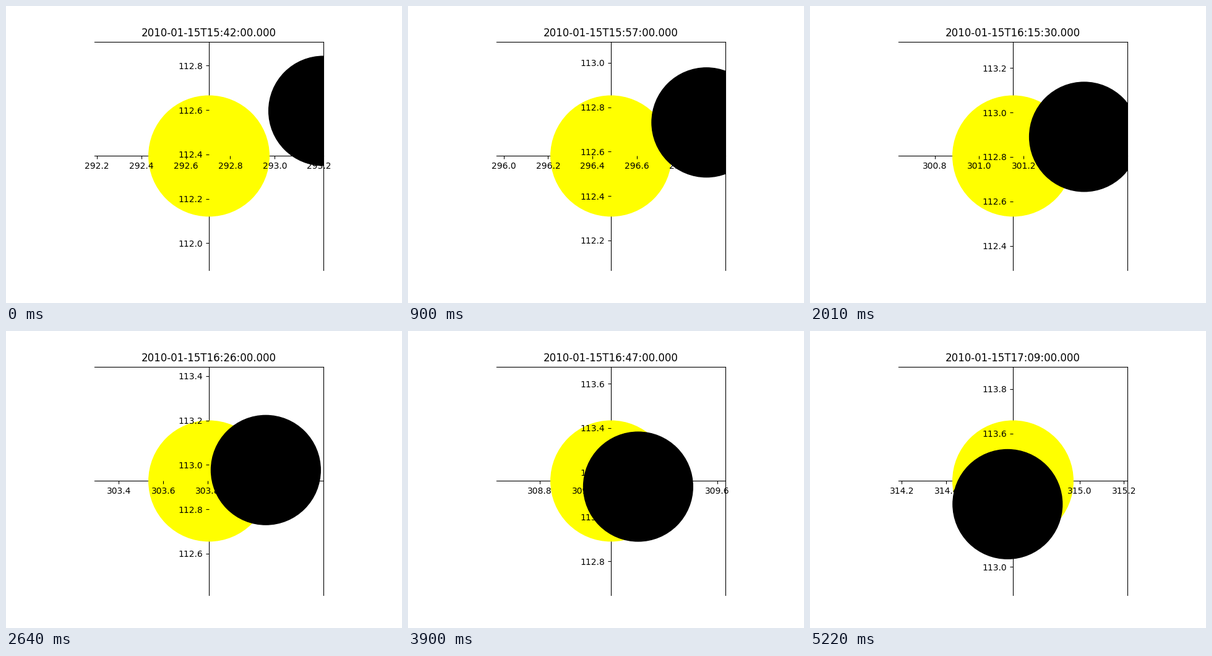
Animation of 640 by 480 pixels, one loop 5.25 s. Source, as a matplotlib script:

```python
import matplotlib.pyplot as plt
from matplotlib.animation import FuncAnimation
from matplotlib.patches import Circle

FRAMES = 175
INTERVAL = 30
STEP_S = 30
START_S = (15 * 60 + 42) * 60

SUN_R = 0.2710
MOON_R = 0.2463
HALF = 1.9 * SUN_R

# Polynomial coefficients in minutes since the start, in degrees
SUN_X = (292.7039, 0.25178, 1.208e-5)
SUN_Y = (112.393, 0.012608, -7.4e-6, -7.2e-8)
OFFSET_X = (0.5155, -5.586e-3, -7.105e-6)
OFFSET_Y = (0.2031, -3.458e-3, -8.9e-7)


def poly(coeffs, t):
    return sum(c * t**k for k, c in enumerate(coeffs))


def timestamp(seconds):
    h, rest = divmod(seconds, 3600)
    m, s = divmod(rest, 60)
    return f"2010-01-15T{h:02d}:{m:02d}:{s:02d}.000"


plt.rcParams["font.family"] = "DejaVu Sans"
fig, ax = plt.subplots(figsize=(6.4, 4.8), dpi=100)
ax.set_aspect("equal")
ax.spines["left"].set_position("center")
ax.spines["bottom"].set_position("center")

# Discs hide the centre lines, while ticks and labels stay on top
sun = ax.add_patch(Circle((0, 0), SUN_R, color="yellow", zorder=2.6))
moon = ax.add_patch(Circle((0, 0), MOON_R, color="black", zorder=2.7))
for axis in (ax.xaxis, ax.yaxis):
    axis.set_zorder(2.8)
title = ax.set_title("")


def update(i):
    t = i * STEP_S / 60
    x, y = poly(SUN_X, t), poly(SUN_Y, t)
    sun.center = x, y
    moon.center = x + poly(OFFSET_X, t), y + poly(OFFSET_Y, t)
    ax.set_xlim(x - HALF, x + HALF)
    ax.set_ylim(y - HALF, y + HALF)
    title.set_text(timestamp(START_S + i * STEP_S))
    return sun, moon, title


anim = FuncAnimation(fig, update, frames=FRAMES, interval=INTERVAL,
                     repeat=True, repeat_delay=0)
plt.show()
```
